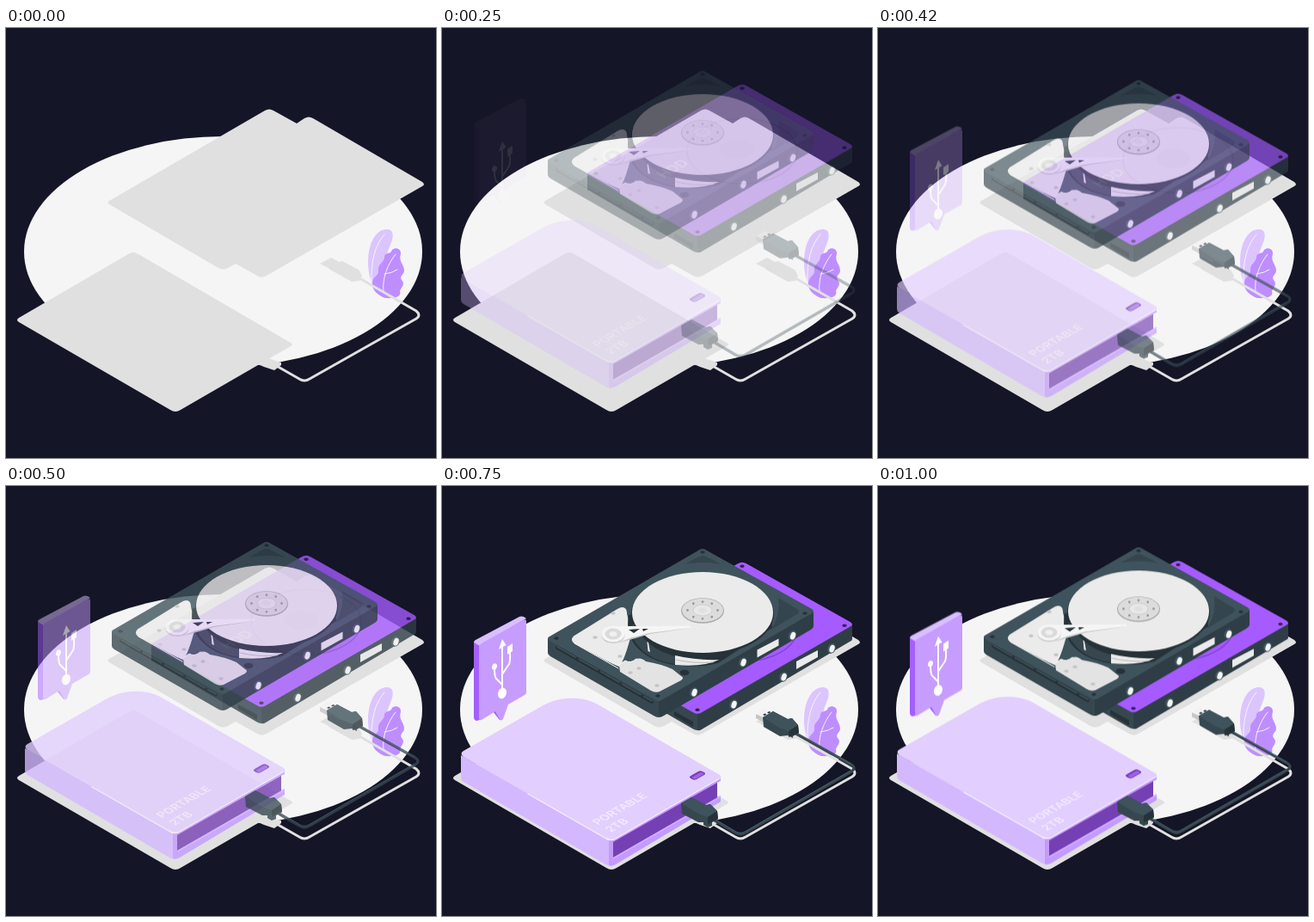
An HTML page for the animation above (1040 ms loop, 500 by 500 pixels).

```html
<!DOCTYPE html>
<html lang="en">
<head>
<meta charset="utf-8">
<title>Portable storage</title>
<style>
html, body { margin: 0; width: 100%; height: 100%; overflow: hidden; background: #141526; }
svg { display: block; width: 500px; height: 500px; }
text { font-family: Inter, Roboto, sans-serif; font-weight: 600; }

/* Nested .drop groups add up their travel and multiply their fade. */
.drop { animation: drop 1040ms -3ms infinite; }
@keyframes drop {
  0%   { transform: translateY(-35px);   opacity: 0;   animation-timing-function: steps(1, end); }
  8%   { transform: translateY(-33.5px); opacity: .04; animation-timing-function: steps(6, end); }
  32%  { transform: translateY(-18px);   opacity: .5;  animation-timing-function: steps(2, end); }
  40%  { transform: translateY(-12.4px); opacity: .66; animation-timing-function: steps(4, end); }
  56%  { transform: translateY(-3.6px);  opacity: .93; animation-timing-function: steps(2, end); }
  64%  { transform: translateY(-1px);    opacity: 1;   animation-timing-function: steps(2, end); }
  72%  { transform: translateY(0);       opacity: 1;   animation-timing-function: steps(3, end); }
  84%  { transform: translateY(-.6px);   opacity: 1;   animation-timing-function: steps(3, end); }
  96%, 100% { transform: translateY(-1.7px); opacity: 1; }
}

.top { fill: #3f535c; }
.left { fill: #37474f; }
.right { fill: #2f3e46; }
.deep { fill: #263238; }
.pale { fill: #ebebeb; }
.line { fill: none; stroke-linecap: round; stroke-linejoin: round; }
</style>
</head>
<body>
<svg viewBox="0 0 500 500">
  <defs>
    <g id="bolt" transform="rotate(20)">
      <ellipse rx="4.600" ry="6" fill="#455a64"/>
      <ellipse cx=".6" rx="2.900" ry="4.500" fill="#f5f5f5"/>
    </g>
    <ellipse id="hole" rx="2.7" ry="1.8"/>
    <path id="label" d="M0 0L25-13V-5L0 9Z" fill="#ebebeb"/>
  </defs>

  <ellipse cx="252.5" cy="260" rx="231.5" ry="134" fill="#f5f5f5"/>

  <!-- plant -->
  <path fill="#dcc5ff" d="M427 300C419 284 419 259 427 245C433 234 445 231 449 237C452 245 445 254 443 264C440 278 436 284 433 302Z"/>
  <path class="line" stroke="#f5f5f5" d="M425 296C424 272 429 252 440 240"/>
  <path fill="#be8eff" d="M441 314C432 311 425 304 426 296C427 288 434 288 433 282C432 274 440 273 440 266C441 260 447 264 449 258C453 254 460 257 459 263C456 271 463 275 463 282C463 287 457 288 460 293C465 298 459 302 458 306C460 311 455 315 441 314Z"/>
  <path class="line" stroke="#f5f5f5" d="M439 306C437 292 444 274 453 263M440 286Q449 285 455 281"/>

  <!-- shadows -->
  <g fill="#e0e0e0">
    <path d="M120 201L301 96Q306 93 311 96L338 111L347 105Q352 102 357 105L484 179Q488 182 484 184L302 288.5Q297 291 292 288L267 274L258 279Q252 282 247 279L120 205Q117 203 120 201Z"/>
    <path d="M15 337L142 263Q148 259 154 263L331 366Q335 368 331 370L203 444Q197 448 191 444L15 342Q11 339.500 15 337Z"/>
    <path d="M293 391L305 384L320 389V392L312 398L300 394Z"/>
    <path d="M365 274L378 267L387 272L391 271L410 281L414 288L411 294L402 295L377 281L375 279Z"/>
    <path class="line" style="fill:none" stroke="#e0e0e0" stroke-width="3" d="M313 392L341 408Q347 412 353 408L477 338Q483 334 477 329L411 291"/>
  </g>

  <!-- rear drive -->
  <g class="drop">
    <path class="left" d="M169 192L297 264V284Q294 284 291 282L169 211Z"/>
    <path class="right" d="M297 264L477 161V178Q477 180 474 181L302 283Q299 285 297 284Z"/>
    <g transform="translate(0 1.2)">
      <path fill="#a55bff" d="M171 189L344 89Q349 86 354 89L475 157Q479 160 475 162L302 262Q297 265 292 262L171 194Q167 192 171 189Z"/>
      <ellipse class="line" cx="349" cy="165" rx="64" ry="38" stroke="#8742df" stroke-width="1.500"/>
      <ellipse cx="343" cy="163" rx="20" ry="11" fill="#9850f2"/>
      <text transform="matrix(.866 -.5 .866 .5 258 197)" font-size="16" fill="#c79bff">HDD</text>
      <g fill="#35205c">
        <use href="#hole" x="349" y="92"/><use href="#hole" x="468" y="161"/>
        <use href="#hole" x="297" y="259"/><use href="#hole" x="179" y="191"/>
      </g>
    </g>
    <path class="deep" d="M270 262L292 274V280L270 267Z"/>
    <use href="#bolt" x="453" y="189"/><use href="#bolt" x="397" y="222"/><use href="#bolt" x="339" y="254"/>
    <use href="#label" x="412" y="204"/>
  </g>

  <!-- front drive -->
  <g class="drop">
    <path class="left" d="M123 177L252 250V269Q249 269 246 267L126 198Q123 196 123 194Z"/>
    <path class="right" d="M252 250L432 146V163Q432 165 429 167L258 267Q255 269 252 269Z"/>
    <path class="top" d="M125 175L298 75Q303 71 308 75L430 143Q434 146 430 148L257 248Q252 252 247 248L125 180Q121 177 125 175Z"/>
    <path fill="#34454e" d="M282 91L299 82Q303 80 307 82L325 91Q303 87 282 91ZM391 130L413 143Q417 146 413 149L383 167Q394 149 391 130Z"/>
    <path class="line" stroke="#263238" stroke-width="4" stroke-linecap="butt" d="M134 188L244 251"/>
    <path class="line" stroke="#455a64" stroke-width="1.200" stroke-dasharray="25 4" d="M134 187L244 250"/>

    <path class="pale" stroke="#ebebeb" stroke-width="2" d="M154 175L204 144Q213 139 214 147C214 155 220 162 220 171C216 181 214 196 206 209Q200 207 193 203L154 182Q150 179 154 175Z"/>
    <path fill="#e3e3e3" d="M206 208L213 203Q219 207 226 201Q232 199 237 204Q255 207 268 213L278 221Q282 223 278 226L253 239Q248 241 243 238L207 216Z"/>
    <path class="line" stroke="#fafafa" d="M206 208L213 203Q219 207 226 201M154 183L205 212"/>
    <path class="deep" d="M217 150C211 181 234 206 280 209Q301 211 321 206L384 165Q384 150 373 128Z"/>
    <path class="left" d="M219 163C220 184 239 203 271 207L271 198Q235 188 224 160Z"/>
    <path class="pale" d="M240 182L242 193L239.500 192L238.500 181ZM271 197Q296 203 322 202Q304 211 271 208Z"/>
    <path class="line" stroke="#a5a5a5" stroke-width=".7" d="M272 202Q294 207 316 205"/>
    <ellipse cx="303" cy="148.500" rx="83" ry="48" class="deep"/>
    <ellipse cx="303" cy="147" rx="82" ry="47" class="pale"/>

    <ellipse cx="303" cy="145" rx="25" ry="14.800" fill="#a9a9a9"/>
    <ellipse cx="303" cy="144.500" rx="24" ry="13.800" fill="#dcdcdc"/>
    <ellipse class="line" cx="303" cy="144.500" rx="17.500" ry="9.800" pathLength="8" stroke="#9a9a9a" stroke-width="2.800" stroke-dasharray="0 1"/>
    <ellipse cx="303" cy="144.500" rx="11" ry="6.500" fill="#e8e8e8" stroke="#c8c8c8" stroke-width=".7"/>
    <ellipse cx="303" cy="144.500" rx="5" ry="3" fill="#e0e0e0"/>

    <path fill="#c4c4c4" d="M204 183L242 172L289 165L240 168Z"/>
    <path fill="#f5f5f5" d="M198 163L242 163L288 162.500Q291 164 288 165L241 171L203 181Z"/>
    <path class="deep" d="M217 167L230 166L223 171ZM233 166L240 166L234 169Z"/>
    <ellipse cx="199" cy="173.500" rx="13.500" ry="9.500" fill="#c8c8c8"/>
    <ellipse cx="199" cy="172" rx="13.500" ry="9.500" fill="#f5f5f5"/>
    <ellipse cx="199" cy="172" rx="9.500" ry="6.500" fill="#dadada"/>
    <ellipse cx="199" cy="172" rx="4.500" ry="3" fill="#f0f0f0"/>

    <g fill="#c4c4c4">
      <use href="#hole" x="199" y="148"/><use href="#hole" x="207" y="198"/><use href="#hole" x="178" y="176"/>
      <use href="#hole" x="219" y="217"/><use href="#hole" x="229" y="212"/><use href="#hole" x="250" y="232"/>
    </g>
    <g class="deep">
      <use href="#hole" x="303" y="77"/><use href="#hole" x="422" y="148"/>
      <use href="#hole" x="133" y="177"/><use href="#hole" x="251" y="244"/>
      <ellipse cx="282" cy="217" rx="5.500" ry="3.200"/>
    </g>
    <use href="#bolt" x="293" y="240"/><use href="#bolt" x="350" y="205"/><use href="#bolt" x="407.500" y="174"/>
    <use href="#label" x="366.500" y="190.500"/>
  </g>

  <!-- portable disk -->
  <g class="drop">
    <path fill="#d4b8ff" d="M22 313L197 413V442Q194 442 190 440L25 344Q22 342 22 339Z"/>
    <path fill="#c49aff" d="M194 411L324 337V343L320 345V362L324 360V367L202 440Q197 443 194 441Z"/>
    <path fill="#7540b3" d="M199 414L320 345V363L199 432Z"/>
    <path fill="#cfaeff" d="M199 432L324 360V362L199 434Z"/>
    <path fill="#e2ceff" d="M25 308L116 256C137 244 163 244 181 254L323 336Q325 338 323 340L202 410Q197 413 192 410L25 315Q20 311 25 308Z"/>
    <path class="line" stroke="#f6f0ff" stroke-width="1.400" d="M100 358L191 410Q197 413 202 410L323 340"/>
    <g transform="matrix(.866 -.5 .866 .5 297 336.500)">
      <rect x="-8" y="-4" width="16" height="8" rx="3" fill="#7540b3"/>
      <rect x="-6.500" y="-1.500" width="13" height="4.500" rx="2" fill="#9d62e8"/>
    </g>
    <g transform="matrix(.866 -.5 .866 .5 181.500 394.500)" font-size="13" fill="#f3eaff">
      <text>PORTABLE</text>
      <text y="17">2TB</text>
    </g>
  </g>

  <!-- cable -->
  <g class="drop">
    <path class="line" stroke="#37474f" stroke-width="3.200" d="M314 387L341 403Q347 407 353 403L476 332Q482 328 476 324L410 287"/>
    <path class="line" stroke="#546e7a" stroke-width=".7" d="M320 389L341 401.500Q347 405 353 401.500L475 331M414 288L475 323"/>

    <path class="left" d="M278 369L290 362L307 371L312 370L320 378L321 387L314 391V395L309 397L304 394V391L298 391L279 381Z"/>
    <path class="top" d="M278 369L290 362L307 371L312 370L320 378L309 385L298 381Z"/>
    <path class="deep" d="M309 385L320 378L321 387L309 393Z"/>

    <path fill="#c6c6c6" d="M365 265L376 270L386 264V269L376 276L365 270Z"/>
    <path fill="#f2f2f2" d="M365 265L375 259L386 264L376 270Z"/>
    <path class="deep" d="M373 266L375.500 264.500L377.500 265.500L375 267ZM378 263.500L380.500 262L382.500 263L380 264.500Z"/>
    <path class="left" d="M373 269L385 262L402 271L407 270L414 278L415 287L408 291V293L402 290L393 291L374 280Z"/>
    <path class="top" d="M373 269L385 262L402 271L407 270L414 278L403 285L392 281Z"/>
    <path class="deep" d="M403 285L414 278L415 287L403 292Z"/>
  </g>

  <!-- sign -->
  <g class="drop">
    <g class="drop">
      <g class="drop">
        <path fill="#a35fff" d="M37 182L44 184V272L40 273Q37 272 37 269Z"/>
        <path fill="#d9bfff" d="M37 182Q37 180 39 179L90 152Q92 151 95 152L98 154L44 186Z"/>
        <path fill="#a35fff" d="M62 261L69 272L67 272L59 262Z"/>
        <path fill="#c79cff" d="M43 187Q43 185 46 183L94 156Q98 154 98 157V240Q98 242 96 243L77 254L71 271Q69 274 67 271L62 262L46 272Q43 273 43 270Z"/>
      </g>
      <g fill="#fff">
        <path class="line" style="fill:none" stroke="#fff" stroke-width="2" d="M70 240V186M70 219L78 207Q79.500 204 79 193M70 231L63 224Q61 222 61 211"/>
        <path d="M70 178L74.500 185L66 190Z"/>
        <path d="M76 187L82 183V192L76 196Z"/>
        <ellipse cx="61" cy="210" rx="2.800" ry="3.800" transform="rotate(20 61 210)"/>
        <ellipse cx="70" cy="241" rx="4.800" ry="6.500" transform="rotate(20 70 241)"/>
      </g>
    </g>
  </g>
</svg>
</body>
</html>
```
